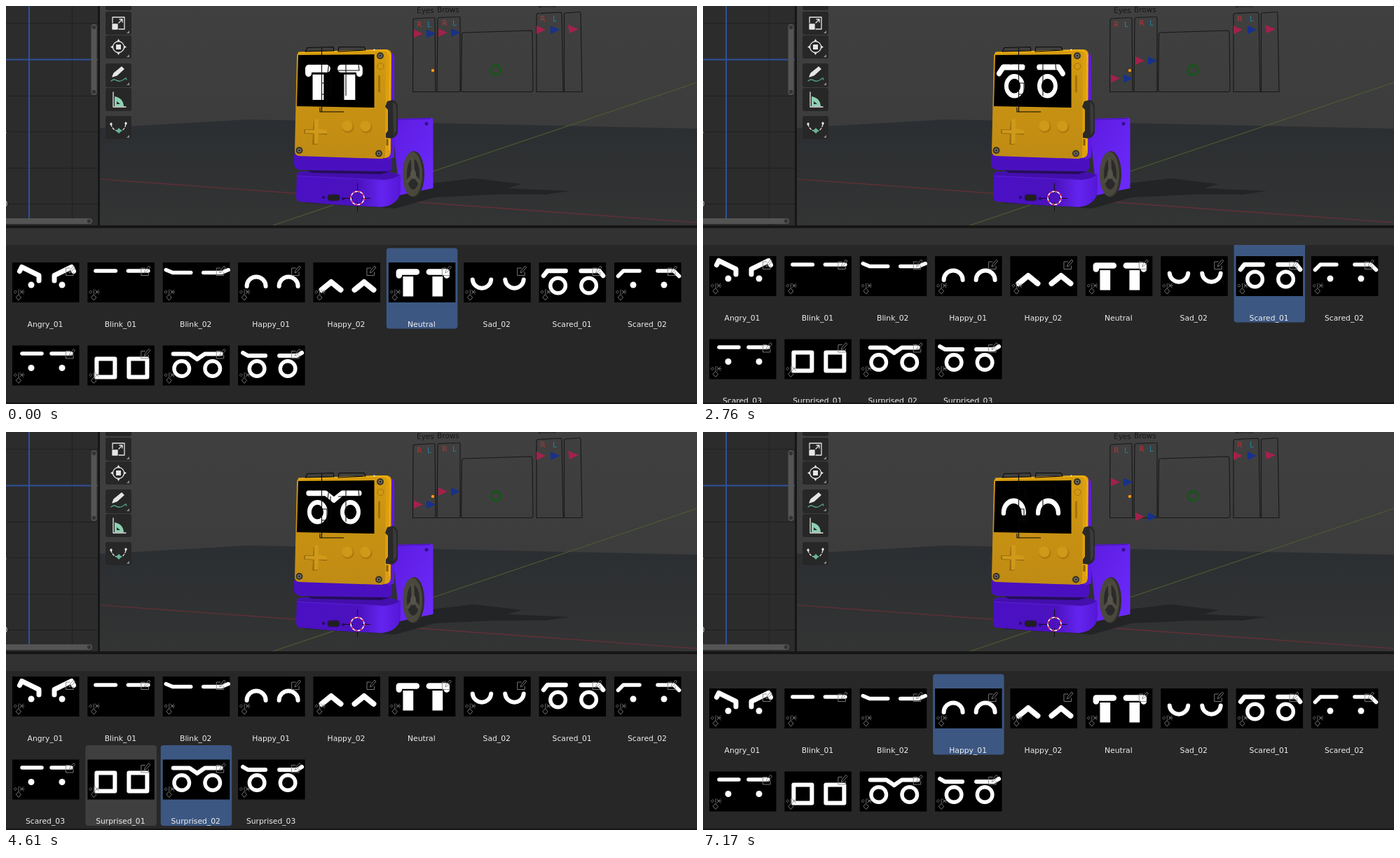
An HTML page that plays this animation: 986 by 568 pixels, repeating every 7.25 s.

```html
<!DOCTYPE html>
<html lang="en">
<head>
<meta charset="utf-8">
<title>Pose library</title>
<style>
  html, body { margin: 0; width: 100%; height: 100%; overflow: hidden; background: #161616; }
  svg { display: block; width: 986px; height: 568px; font-family: "DejaVu Sans", sans-serif; }
  .line { fill: none; stroke-linejoin: round; stroke-linecap: round; }
  .rig { fill: none; stroke: #171717; stroke-width: 1.1; stroke-linejoin: round; }
  .label { fill: #eee; font-size: 10.75px; text-anchor: middle; }
  .red { fill: #a3214a; } .blue { fill: #17318c; }
</style>
</head>
<body>
<svg viewBox="0 0 986 568">
  <defs>
    <linearGradient id="sky" x2="0" y2="1"><stop stop-color="#404040"/><stop offset="1" stop-color="#393939"/></linearGradient>
    <linearGradient id="floor" x2="0" y2="1"><stop stop-color="#2b2e32"/><stop offset=".5" stop-color="#2f3132"/><stop offset="1" stop-color="#333434"/></linearGradient>
    <linearGradient id="front" x2="0" y2="1"><stop stop-color="#d69c0f"/><stop offset=".5" stop-color="#c79112"/><stop offset="1" stop-color="#c08b14"/></linearGradient>
    <linearGradient id="base"><stop stop-color="#4a10c4"/><stop offset=".6" stop-color="#4b12bd"/><stop offset=".82" stop-color="#6424f0"/><stop offset="1" stop-color="#5517d6"/></linearGradient>
    <linearGradient id="block" x2="1" y2="1"><stop stop-color="#5d1be0"/><stop offset="1" stop-color="#6c2bfc"/></linearGradient>
    <clipPath id="list"><path d="M0 341H986V566H0z"/></clipPath>
    <clipPath id="view"><path d="M134 0H986V313H134z"/></clipPath>
    <g id="badges" class="line" stroke="#858585" stroke-width=".9">
      <path d="M82 8H76.500V18.500H87V14M81 14.500L82 11.500L87.500 5L89.500 7L84 13.500Z"/>
      <path d="M9 46L12.500 50L9 54L5.500 50Z"/>
      <path d="M2.500 42L4.500 40L6.500 42L4.500 44ZM9 39V45M12 42H17M11 39L16 45M11 45L16 39" stroke-width=".8"/>
    </g>
    <g id="screw"><circle r="5" fill="#39352a"/><circle r="2.800" fill="#77736a"/><circle r="1.300" fill="#1f1d18"/></g>
  </defs>

  <!-- curve editor -->
  <path d="M0 0H131V313H0z" fill="#2c2c2c"/>
  <path d="M0 24.500H131M0 128.500H131M0 179.500H131M0 231.500H131M0 282.500H131M94.500 0V313" stroke="#202020"/>
  <path d="M0 76.500H131M33 0V303" stroke="#2e509b" stroke-width="2"/>
  <g fill="#d8d8d8" font-size="10"><text x="-5" y="183">5</text><text x="-4" y="286">0</text></g>
  <g fill="#545454">
    <rect x="121.500" y="26" width="8" height="101" rx="4"/><rect x="-9" y="303" width="132" height="8" rx="4"/>
    <g fill="#333"><circle cx="125.500" cy="30.500" r="2.700"/><circle cx="125.500" cy="122.500" r="2.700"/><circle cx="118.500" cy="307" r="2.700"/></g>
  </g>

  <!-- viewport -->
  <g clip-path="url(#view)">
    <path d="M134 0H986V313H134z" fill="url(#sky)"/>
    <path d="M134 174L345 162L610 167L986 175V313H134z" fill="url(#floor)"/>
    <path d="M134 247L986 309" stroke="#6b2f38" stroke-width="1.200"/>
    <path d="M381 313L986 109" stroke="#4b5930" stroke-width="1.200"/>
    <path d="M425 281L555 289L612 273L700 269L770 269L805 264L715 260L736 254L668 246L590 255z" fill="#222425"/>

    <!-- robot -->
    <path d="M550 161L606 159.500Q609.500 159.500 609.500 163V260L562 270z" fill="url(#block)"/>
    <path d="M555 162L606 160.500" stroke="#4a14bd" stroke-width="1.500"/>
    <circle cx="600" cy="168" r="2.500" fill="#31108a"/>
    <ellipse cx="582" cy="240" rx="15" ry="33" fill="#2f2e28"/>
    <ellipse cx="580" cy="240" rx="14" ry="32" fill="#4a483d"/>
    <ellipse cx="581" cy="240" rx="9" ry="22" fill="#2b2a2a"/>
    <path d="M581 240L580 217M581 240L572 252M581 240L590 252" stroke="#504e43" stroke-width="4.500"/>
    <ellipse cx="581" cy="240" rx="4" ry="7" fill="#57544a"/>
    <path d="M415 240Q417 236 424 236L545 236L563 241V265Q560 284 536 287Q475 285 418 279Q414 278 414 270z" fill="url(#base)"/>
    <path d="M416 240L424 236H545L562 241Q556 247 540 248L416 242z" fill="#430fad"/>
    <path d="M430 234.500L548 236L535 240L436 238z" fill="#260c5c"/>
    <path d="M416 242.500L540 248.500Q557 247 562 241.500" class="line" stroke="#5a1fd8"/>
    <rect x="459" y="269" width="17" height="9" rx="3.500" fill="#202020" stroke="#350d7e"/>
    <circle cx="453" cy="273" r="2.200" fill="#2b0b70"/><circle cx="481" cy="275" r="2.200" fill="#2b0b70"/>
    <path d="M411 212L551 216V231Q550 236 544 236L420 234Q411 232 411 226z" fill="#4a10c0"/>
    <path d="M545 64Q554 67 554 74V216L545 219z" fill="#5d1ae0"/>
    <path d="M536 62H544Q550 63 550 70L549 209Q548 217 540 217L530 216z" fill="#dc9f10"/>
    <path d="M420 66L537 62Q542 62 542 68L541 212Q541 218 535 218L418 214Q412 213 412 207L415 72Q415 66 420 66z" fill="url(#front)"/>
    <path d="M418 66.500L537 63Q547 63 548 72L547 205" class="line" stroke="#f0b010" stroke-width="2"/>
    <path d="M417 70L525.500 69L525.500 145L415 143z"/>
    <path d="M439 164L445 162L445 176L458 177V184L445 183L444 198L437 198L438 183L425 182V176L438 176z" fill="#9f7110"/>
    <path d="M440 162L446 161L446 175L458 177V182L446 182L445 196L440 197L440 182L427 181V177L440 177z" fill="#cf9919"/>
    <g fill="#a9780f"><circle cx="488" cy="172.500" r="8.500"/><circle cx="514" cy="173" r="8.500"/></g>
    <g fill="#cf9919"><circle cx="487" cy="171" r="7.800"/><circle cx="513" cy="171.500" r="7.800"/></g>
    <circle cx="534.500" cy="86" r="4.500" fill="#d29a12" stroke="#a3740c"/>
    <path d="M532.500 100V122" class="line" stroke="#a3740c" stroke-width="3"/>
    <use href="#screw" x="534" y="71"/><use href="#screw" x="418.500" y="206"/><use href="#screw" x="532" y="210.500"/>
    <path d="M544 136L552 134Q558 136 559 143V180Q557 188 550 189L542 188V182L545 178V148L541 144z" fill="#292929"/>
    <path d="M552 137Q557 140 557 146V178L553 185z" fill="#3b3b3b"/>
    <path d="M544 190V199" stroke="#86600b" stroke-width="3"/>
    <g id="face" class="line" transform="translate(415.500 72) scale(1.070 1.280)"></g>
    <path class="rig" style="stroke:#090909" d="M430 59.500L467 58.500L468 64L427 65zM475 58.500L511 58.500L513 63L474 65zM450.500 60V151M448 145V151H482M463 92V126H450M438 83L461 80L459 96M474 92H504L502 75M485 80V128M450 110H458V130"/>
    <circle cx="525.500" cy="62.500" r="1" fill="#fff"/>

    <!-- rig sliders -->
    <path class="rig" d="M583 18L610 16.500Q612 16 612 19L613 122.500H580.500L581 21Q581 18 583 18zM618 16.500L646 15.500Q648 15 648 18V122.500H615L616 19Q616 17 618 16.500zM653 38L748 35Q751 35 751 38L752 120Q752 122.500 749 122.500H652Q649.500 122.500 649.500 120L650.500 41Q650.500 38 653 38zM759 10.500L791 9Q793 9 793 12L795 122.500H757V13Q757 11 759 10.500zM798 10L818 8.500Q820 8 820 11L822 122.500H796.500V12Q796.500 10 798 10z"/>
    <g fill="#171717" font-size="10.500"><text x="586" y="10">Eyes</text><text x="615" y="9">Brows</text><text x="759" y="2">Blink</text></g>
    <g font-size="10.500" text-anchor="middle">
      <g fill="#b83232"><text x="590" y="30">R</text><text x="626" y="28">R</text><text x="766" y="22">R</text></g>
      <g fill="#277f9f"><text x="604" y="30">L</text><text x="640" y="28">L</text><text x="783" y="22">L</text></g>
    </g>
    <g id="eyes"><path class="red" d="M582-6L595 0L582 6z"/><path class="blue" d="M600-6L613 0L600 6z"/></g>
    <g id="brows"><path class="red" d="M617-6L630 0L617 6z"/><path class="blue" d="M635-6L648 0L635 6z"/></g>
    <path class="red" d="M757 28L770 34L757 40zM802 27L817 33L804 39z"/><path class="blue" d="M777 28L790 34L777 40z"/>
    <circle cx="699" cy="91.500" r="7" fill="none" stroke="#0f5a13" stroke-width="2.500"/>
    <circle cx="609" cy="92" r="2.700" fill="#f59a1b" stroke="#222" stroke-width=".7"/>

    <!-- 3D cursor -->
    <path d="M501.500 253V267M501.500 280V293M482 274.500H495M508 274.500H520" stroke="#111"/>
    <circle cx="501.500" cy="274" r="9.500" fill="none" stroke="#fff" stroke-width="1.600"/>
    <circle cx="501.500" cy="274" r="9.500" fill="none" stroke="#e3263e" stroke-width="1.600" stroke-dasharray="3.730"/>

    <!-- toolbar -->
    <path d="M142 0H179V3Q179 6 176 6H145Q142 6 142 3z" fill="#272727"/>
    <g fill="#272727"><rect x="142" y="8" width="37" height="33" rx="3"/><rect x="142" y="42" width="37" height="33" rx="3"/><rect x="142" y="82" width="37" height="34" rx="3"/><rect x="142" y="117" width="37" height="33" rx="3"/><rect x="142" y="157" width="37" height="33" rx="3"/></g>
    <path d="M176 35V39H172zM176 69V73H172zM176 109V113H172zM176 184V188H172z" fill="#8c8c8c"/>
    <g class="line" stroke="#e6e6e6" stroke-width="1.300">
      <path d="M152 24V16H169V33H161M161 24L166 19M162 19H166V23"/><path d="M152 26H159V33H152z" fill="#e6e6e6"/>
      <circle cx="160.500" cy="58.500" r="8"/>
      <path d="M157 55H164V62H157z" fill="#e6e6e6" stroke="none"/>
      <path d="M160.500 47L163 51H158zM160.500 70L163 66H158zM149 58.500L153 56V61zM172 58.500L168 56V61z" fill="#e6e6e6" stroke="none"/>
      <path d="M152 101L154 96L165 87L168 90L158 99z" fill="#e6e6e6"/><path d="M150 107C157 101 158 111 166 106S170 103 172 105" stroke="#54a584"/>
      <path d="M155 129Q167 131 168 143H155z" fill="#8fd0b3" stroke="none"/><path d="M153 123V144H171"/><path d="M158 136V140H163z" fill="#272727" stroke="none"/>
      <path d="M150 169C152 180 169 184 171 168" stroke-dasharray="3 2.500"/>
      <path d="M161 174L165 178L161 182L157 178z" fill="#62b694" stroke="none"/><path d="M150 166L152 168.500L150 171L148 168.500zM171 165L173 167.500L171 170L169 167.500z" fill="#e6e6e6" stroke="none"/>
    </g>
  </g>

  <!-- asset shelf -->
  <path d="M0 317H986V341H0z" fill="#323232"/>
  <path d="M0 341H986V566H0z" fill="#272727"/>
  <g clip-path="url(#list)"><g id="shelf"></g></g>
</svg>
<script>
const $ = id => document.getElementById(id);

// Each pose draws one half of the face; the other half is its mirror image.
const stroke = (d, width = 6) => `<path d="${d}" stroke-width="${width}"/>`;
const ring = '<circle cx="27" cy="33" r="10.800" stroke-width="5.400"/>';
const dot = '<circle cx="27" cy="32" r="4.500" fill="#fff" stroke="none"/>';
const poses = [
  ['Angry_01', stroke('M10.500 12.500L13.500 6.500L38 18.500V26', 7) + dot],
  ['Blink_01', stroke('M11.500 12H40', 5.5)],
  ['Blink_02', stroke('M4.500 10.500L14 14.500H40', 5.5)],
  ['Happy_01', stroke('M12.500 34A13.500 13.500 0 0 1 39.500 34')],
  ['Happy_02', stroke('M12 39L25.500 28L39 39', 8)],
  ['Neutral', stroke('M15 18.500V13.500H40', 8.5) +
    '<path d="M20 19.500H36V49H20z" fill="#fff" stroke="#000" stroke-width="1.200"/>'],
  ['Sad_02', stroke('M12.500 24.500A13.300 13.300 0 0 0 39 24.500')],
  ['Scared_01', stroke('M6.500 19L12 12H38', 6.5) + ring],
  ['Scared_02', stroke('M5.500 19.500L13 12H36', 5.5) + dot],
  ['Scared_03', stroke('M14 11.500H42', 5.5) + dot],
  ['Surprised_01', stroke('M13 19H39V45H13z')],
  ['Surprised_02', stroke('M15 12H38L49 19.500') + ring],
  ['Surprised_03', stroke('M7 10.500L14 14.500H39') + ring],
];
const bothSides = half =>
  `<g class="line" stroke="#fff">${half}<g transform="translate(98 0) scale(-1 1)">${half}</g></g>`;

$('shelf').innerHTML = poses.map(([name, half], i) => {
  const x = 6 + (i % 9) * 107.37, y = 345.5 + Math.floor(i / 9) * 118.5;
  return `<g transform="translate(${x} ${y})">
    <rect class="cell" width="101.500" height="115" rx="4" fill="none"/>
    <rect x="3" y="20.500" width="95.500" height="57"/>
    <g transform="translate(3 20.500)">${bothSides(half)}<use href="#badges"/></g>
    <text class="label" x="50" y="112">${name}</text></g>`;
}).join('');
const cells = document.querySelectorAll('.cell');

// Slider heights [eyes, brows] for the poses that get applied.
const sliders = { 0: [61, 99.5], 3: [71.5, 121], 4: [91, 121], 5: [39.5, 38], 7: [103.5, 78], 10: [50, 121], 11: [103.5, 85], 12: [103.5, 92] };

const LOOP = 7250;
const events = [
  [340, { hover: 3 }], [690, { selected: 3 }], [940, { face: 3 }],
  [1290, { hover: 4 }], [1550, { selected: 4 }], [1720, { face: 4 }],
  [1890, { hover: 5 }], [1980, { hover: 6 }], [2070, { hover: 7 }], [2260, { selected: 7 }], [2430, { face: 7 }],
  [2680, { hover: -1, scroll: 9 }], [2770, { scroll: 17 }], [2860, { hover: 12 }],
  [3120, { selected: 12 }], [3290, { face: 12 }],
  [3640, { hover: 11 }], [3820, { selected: 11 }], [4000, { face: 11 }],
  [4520, { hover: 10 }], [4700, { selected: 10 }], [4860, { face: 10 }],
  [5030, { hover: -1, scroll: 9 }], [5120, { scroll: 0 }], [5200, { hover: 0 }],
  [5370, { selected: 0 }], [5540, { face: 0 }],
  [5900, { hover: 1 }], [5980, { hover: 2 }], [6150, { hover: 3 }], [6240, { selected: 3 }], [6410, { face: 3 }],
  [6910, { hover: -1 }],
];

function stateAt(time) {
  const state = { hover: -1, selected: 5, face: 5, scroll: 0 };
  for (const [start, change] of events) if (time >= start) Object.assign(state, change);
  return state;
}

function cellColour(i, { hover, selected }) {
  if (i === selected) return i === hover ? '#516f9b' : '#3c5782';
  return i === hover ? '#3f3f3f' : 'none';
}

let shownFace = -1;
function draw(now) {
  const state = stateAt(now % LOOP);
  cells.forEach((cell, i) => cell.setAttribute('fill', cellColour(i, state)));
  $('shelf').setAttribute('transform', `translate(0 ${-state.scroll})`);
  if (state.face !== shownFace) {
    shownFace = state.face;
    const [eyes, brows] = sliders[shownFace];
    $('face').innerHTML = bothSides(poses[shownFace][1]);
    $('eyes').setAttribute('transform', `translate(0 ${eyes})`);
    $('brows').setAttribute('transform', `translate(0 ${brows})`);
  }
}

const start = performance.now();
function tick() {
  draw(performance.now() - start);
  requestAnimationFrame(tick);
}
tick();
</script>
</body>
</html>
```
